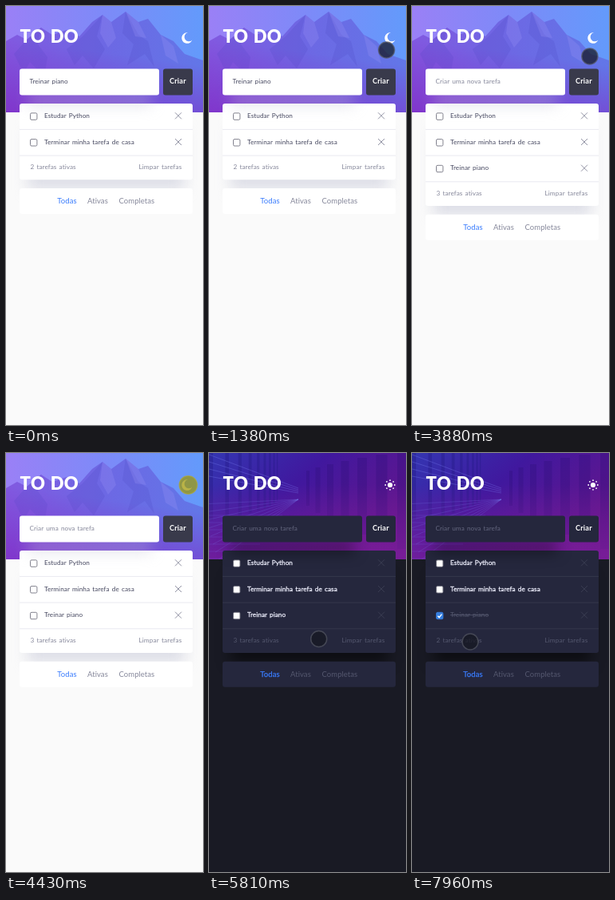
Write an HTML page that moves like this. It is 247x524 px and loops after 8 s.

```html
<!DOCTYPE html>
<html lang="pt">
<head>
<meta charset="utf-8">
<title>To do</title>
<style>
html, body { margin: 0; width: 100%; height: 100%; overflow: hidden; }
svg {
  --bg: #fafafa; --card: #fff; --line: #e9e9f0; --task: #45475f; --muted: #85879a;
  --hint: #85879a; --button: #393a4b; --cross: #6c6e84; --weight: 0; --shade: rgba(194, 195, 214, .5);
  display: block; width: 100%; height: 100%; background: var(--bg);
  font: 8.2px Lato, "Open Sans", sans-serif; letter-spacing: .06px; word-spacing: 1px;
}
svg.dark {
  --bg: #191a24; --card: #25273d; --line: #35374b; --task: #e9eaf8; --muted: #55586f;
  --hint: #64677f; --button: #25273d; --cross: #414459; --weight: .3; --shade: rgba(0, 0, 0, .5);
}
.day, .dark .night { display: inline; }
.night, .dark .day { display: none; }
.card { fill: var(--card); }
.shadow { fill: var(--shade); filter: blur(9px); }
.rule { stroke: var(--line); }
.task text { fill: var(--task); stroke: var(--task); stroke-width: var(--weight); }
.task path { stroke: var(--cross); stroke-width: .75; fill: none; }
.task .rule { stroke: var(--line); stroke-width: 1; }
.box { fill: #fff; stroke: #747482; stroke-width: .9; }
.muted { fill: var(--muted); }
.task.done text { fill: var(--muted); stroke: none; text-decoration: line-through; }
.task.done .box { fill: #367fe0; stroke: #367fe0; }
.task .tick { stroke: #fff; stroke-width: 1.4; display: none; }
.task.done .tick { display: inline; }
.tabs { font-size: 9.5px; fill: var(--muted); }
.on { fill: #3a7cfd; }
.dark .on { stroke: #3a7cfd; stroke-width: .25; }
</style>
</head>
<body>
<svg id="app" viewBox="0 0 247 524" preserveAspectRatio="none">
  <defs>
    <linearGradient id="sky" x1="0" y1="0" x2="1" y2="0">
      <stop offset="0" stop-color="#9a80f6"/>
      <stop offset=".5" stop-color="#7d8af8"/>
      <stop offset="1" stop-color="#639afb"/>
    </linearGradient>
    <linearGradient id="rock" x1="0" y1="0" x2="1" y2="0">
      <stop offset="0" stop-color="#7d52dc"/>
      <stop offset=".5" stop-color="#6a62e0"/>
      <stop offset="1" stop-color="#6270e4"/>
    </linearGradient>
    <linearGradient id="haze" x1=".25" y1="0" x2="0" y2="1">
      <stop offset=".35" stop-color="#8030c8" stop-opacity="0"/>
      <stop offset="1" stop-color="#8030c8" stop-opacity=".85"/>
    </linearGradient>
    <linearGradient id="hall" x1="0" y1="0" x2="1" y2=".6">
      <stop offset="0" stop-color="#3436b2"/>
      <stop offset=".45" stop-color="#40189e"/>
      <stop offset="1" stop-color="#66168c"/>
    </linearGradient>
    <linearGradient id="floor" x1="0" y1="0" x2="0" y2="1">
      <stop offset=".3" stop-color="#7e1f9c" stop-opacity="0"/>
      <stop offset="1" stop-color="#7e1f9c" stop-opacity=".75"/>
    </linearGradient>
    <clipPath id="head"><path d="M0 0H247V133H0z"/></clipPath>
  </defs>

  <g clip-path="url(#head)">
    <g class="day">
      <path fill="url(#sky)" d="M0 0H247V133H0z"/>
      <path fill="url(#rock)" opacity=".85" d="M0 44L14 36 26 42 44 27 58 36 76 30 92 38 108 20 121 11 132 20 150 7 166 20 178 16 194 36 210 44 224 60 247 68V133H0z"/>
      <path fill="#4f48c4" opacity=".22" d="M44 27L40 48 52 64 48 88 30 70 22 84 10 60 26 42zM121 11L114 38 124 54 110 78 96 62 86 74 76 54 96 38zM150 7L146 34 160 48 152 74 174 60 186 76 178 44 166 36z"/>
      <path fill="#a8a0f8" opacity=".2" d="M121 11L132 20 138 40 128 52 118 34zM150 7L166 20 176 40 162 38zM194 36L210 50 216 72 200 62z"/>
      <path fill="url(#haze)" d="M0 0H247V133H0z"/>
    </g>
    <g class="night">
      <path fill="url(#hall)" d="M0 0H247V133H0z"/>
      <g id="pillars"></g>
      <path fill="url(#floor)" d="M0 0H247V133H0z"/>
      <g id="tiles" stroke="#7f86f4" fill="none"></g>
    </g>
  </g>

  <text x="17.5" y="46.4" fill="#fff" font-size="22" font-weight="900" letter-spacing=".4">TO DO</text>
  <path class="day" fill="#fff" d="M228 33.3A6.8 6.8 0 1 0 233.4 42.5 5.6 5.6 0 1 1 228 33.3z"/>
  <g class="night" fill="#fff">
    <circle cx="227" cy="40" r="3.1"/>
    <g id="rays"></g>
  </g>

  <rect id="listShade" class="shadow" x="27" y="155" width="197"/>
  <rect id="list" class="card" x="17" y="122" width="217" rx="3"/>
  <rect class="shadow" x="27" y="112" width="155" height="12"/>
  <rect class="card" x="17" y="78.5" width="175" height="33" rx="3"/>
  <text id="entry" x="29.5" y="97"></text>
  <path id="caret" stroke="#333" stroke-width=".7" d="M78.9 90.5V99"/>
  <rect x="197" y="78.5" width="37" height="33" rx="3" fill="var(--button)"/>
  <text x="215.4" y="97.3" text-anchor="middle" fill="#fff" font-size="9.2" font-weight="700" letter-spacing=".2">Criar</text>

  <g id="tasks"></g>
  <g id="foot">
    <text id="count" class="muted" x="30.5" y="204"></text>
    <text class="muted" x="220.5" y="204" text-anchor="end" letter-spacing=".15">Limpar tarefas</text>
    <rect class="card" x="17" y="228" width="217" height="32" rx="3"/>
    <g class="tabs">
      <text class="on" x="64.3" y="246.9">Todas</text>
      <text x="102" y="246.9">Ativas</text>
      <text x="141.5" y="246.9">Completas</text>
    </g>
  </g>
  <circle id="touch"/>
</svg>

<script>
const $ = id => document.getElementById(id);
const LOOP = 8000, ADDED = 2870, DARK = 4500, CHECKED = 7830;
const PRESSES = [2800, 4430, 7500], PRESS_TIME = 70;
const ROW = 32.7;

// start, end, target x and y, ease-out power, optional control point
const START = [214, 495];
const LEGS = [
  [330, 1100, 207, 107, 1.3, 156, 300],
  [1110, 1660, 228, 37, 2],
  [2060, 2600, 214.5, 97, 1.6],
  [3530, 4300, 228.5, 40, 1.5],
  [5190, 6060, 120, 270, 1.45],
  [6080, 6280, 117, 277, 1.5],
  [6550, 7370, 36, 206, 1.5, 150, 250],
  [7770, 7960, 73, 236, 1.4]
];

const repeat = (n, draw) => Array.from({ length: n }, (_, i) => draw(i)).join('');

const taskRow = (label, i) => {
  const y = 122 + i * ROW;
  return `<g class="task"><rect class="box" x="30.5" y="${y + 11.9}" width="8.4" height="8.4" rx="1.5"/>
    <path class="tick" d="M32.3 ${y + 16.3}l1.8 1.9 3.2-4"/>
    <text x="48" y="${y + 18}">${label}</text>
    <path d="M212 ${y + 11.3}l8 8m0-8l-8 8"/>
    <path class="rule" d="M17 ${y + 32.4}h217"/></g>`;
};
$('tasks').innerHTML = ['Estudar Python', 'Terminar minha tarefa de casa', 'Treinar piano'].map(taskRow).join('');
const added = $('tasks').lastElementChild;

$('rays').innerHTML = repeat(8, i =>
  `<circle cx="227" cy="34.2" r=".9" transform="rotate(${i * 45} 227 40)"/>`);

// Corridor: pillars on both sides, floor tiles running to the vanishing point
$('pillars').innerHTML = repeat(7, i => {
  const x = 122 + i * (10 + i * 1.5);
  return `<path fill="#2c0f78" opacity=".3" d="M${x} ${22 - i * 4}h${4 + i * 2}V${66 + i * 9}h${-4 - i * 2}z"/>`;
}) + repeat(9, i => {
  const x = 102 * (1 - .8 ** i);
  return `<path fill="#241a86" opacity=".4" d="M${x} 0h${5 - i * .45}V${84 - i * 3}h${i * .45 - 5}z"/>`;
});
$('tiles').innerHTML = repeat(8, i => `<path opacity=".2" d="M${i * 3 - 10} ${64 + i * 10}L112 58"/>`)
  + repeat(7, i => `<path opacity=".16" d="M0 ${78 + i * 9}H${92 - i * 7}"/>`)
  + repeat(4, i => `<path opacity=".3" d="M0 ${2 + i * 9}L112 ${44 + i * 2}"/>`);

function touchAt(t) {
  let [x, y] = START;
  for (const [t0, t1, tx, ty, power, cx = (x + tx) / 2, cy = (y + ty) / 2] of LEGS) {
    if (t < t0) break;
    const p = Math.min(1, (t - t0) / (t1 - t0));
    const s = 1 - (1 - p) ** power, r = 1 - s;
    x = r * r * x + 2 * r * s * cx + s * s * tx;
    y = r * r * y + 2 * r * s * cy + s * s * ty;
  }
  return [x, y];
}

function setAttrs(el, attrs) {
  for (const k in attrs) el.setAttribute(k, attrs[k]);
}

function render(t) {
  const hasNew = t >= ADDED, done = t >= CHECKED;
  const pressed = PRESSES.some(p => t >= p && t < p + PRESS_TIME);
  const grow = hasNew ? ROW : 0;
  $('app').classList.toggle('dark', t >= DARK);
  added.classList.toggle('done', done);
  added.style.display = hasNew ? '' : 'none';
  $('list').setAttribute('height', 95.3 + grow);
  $('listShade').setAttribute('height', 75 + grow);
  $('foot').setAttribute('transform', `translate(0 ${grow})`);
  $('count').textContent = `${hasNew && !done ? 3 : 2} tarefas ativas`;
  $('entry').textContent = hasNew ? 'Criar uma nova tarefa' : 'Treinar piano';
  $('entry').style.fill = hasNew ? 'var(--hint)' : 'var(--task)';
  $('caret').style.display = t >= PRESSES[0] && !hasNew ? '' : 'none';

  const [cx, cy] = touchAt(t);
  setAttrs($('touch'), {
    cx, cy,
    r: pressed ? 11.3 : 10,
    fill: pressed ? 'rgba(160,150,0,.72)' : 'rgba(22,23,34,.74)',
    stroke: pressed ? 'rgba(176,170,50,.7)' : 'rgba(82,84,96,.75)',
    'stroke-width': pressed ? 1.2 : 1.5,
    visibility: t < LEGS[0][0] ? 'hidden' : 'visible'
  });
}

function tick() {
  render(performance.now() % LOOP);
  requestAnimationFrame(tick);
}
tick();
</script>
</body>
</html>
```
